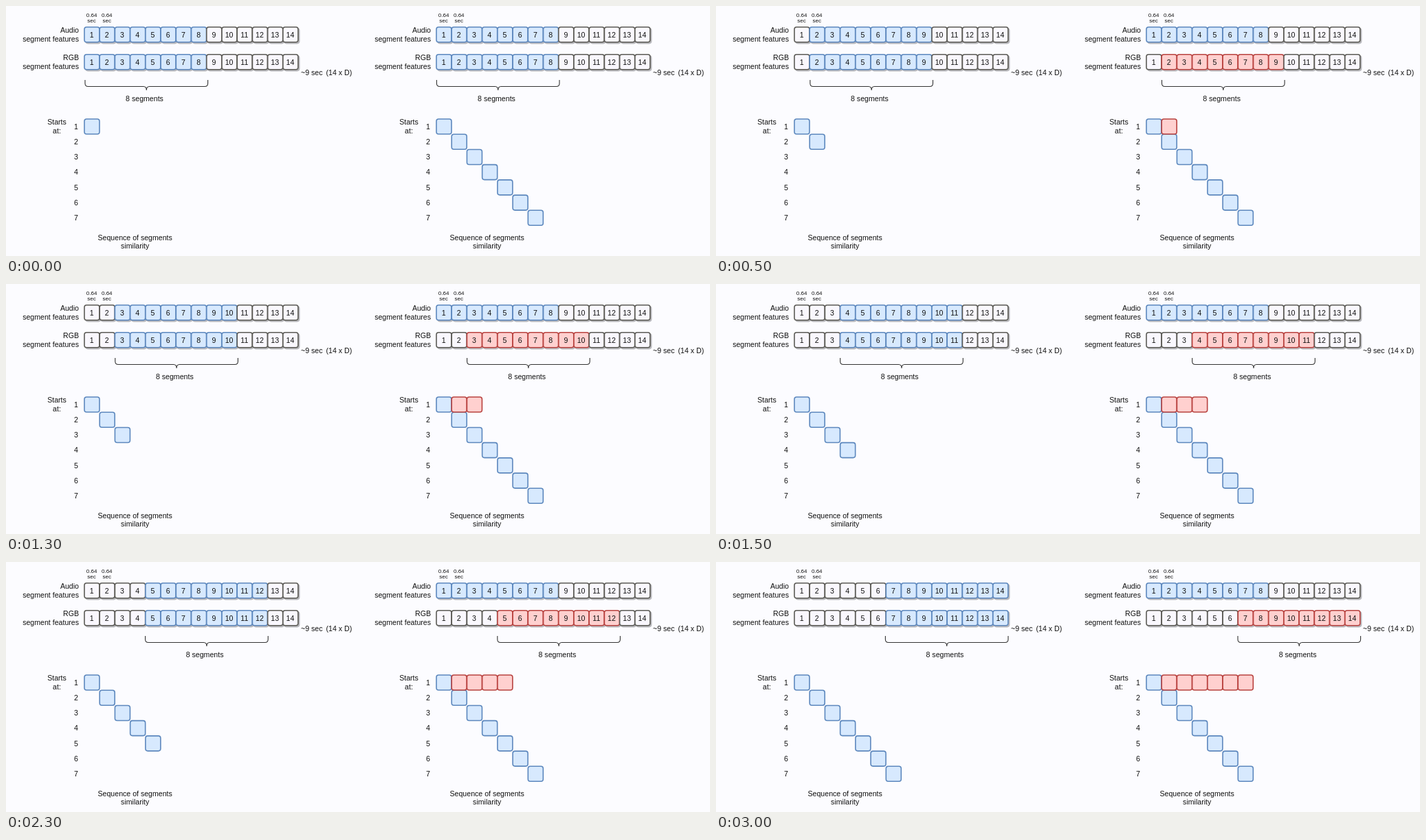
An HTML page that plays this animation: 1024 px wide and 365 px high, repeating every 3500 ms.

```html
<!DOCTYPE html>
<html lang="en">
<head>
<meta charset="utf-8">
<title>Segment similarity</title>
<style>
  html, body { margin: 0; width: 100%; height: 100%; overflow: hidden; background: #fcfcff; }
  svg { display: block; width: 100%; height: 100%; }
  text { font: 10.6px "Liberation Sans", Arial, sans-serif; fill: #111; text-anchor: middle; }
  .end { text-anchor: end; }
  .start { text-anchor: start; }
  .small { font-size: 8px; }
  rect { stroke-width: 1.6; }
  .plain { fill: #f9f7fd; stroke: #5b5a55; }
  .blue { fill: #d7e9fe; stroke: #5c87bd; }
  .red { fill: #ffd0cf; stroke: #b8423f; }
  .shadow { fill: #b9b9bd; stroke: #b9b9bd; }
  .brace { fill: none; stroke: #333; stroke-width: 1.1; }
</style>
</head>
<body>
<svg id="stage" viewBox="0 0 1024 365"></svg>
<script>
const STEPS = 7, STEP_MS = 500, SEGMENTS = 14, SPAN = 8;
const PITCH = 22.22, SIZE = 22, LEFT = 114;
const stage = document.getElementById('stage');

function add(parent, tag, attrs, content = '') {
  const node = document.createElementNS('http://www.w3.org/2000/svg', tag);
  for (const key in attrs) node.setAttribute(key, attrs[key]);
  node.textContent = content;
  parent.append(node);
  return node;
}

const label = (parent, x, y, content, cls = '') =>
  add(parent, 'text', { x, y, class: cls }, content);

const cell = (parent, col, y, cls, shift = 0) =>
  add(parent, 'rect', {
    x: LEFT + col * PITCH + shift, y: y + shift,
    width: SIZE, height: SIZE, rx: 3.3, class: cls
  });

function featureRow(panel, y, name) {
  label(panel, 106, y + 8.4, name, 'end');
  label(panel, 106, y + 21, 'segment features', 'end');
  for (let i = 0; i < SEGMENTS; i++) cell(panel, i, y, 'shadow', 1.8);
  return Array.from({ length: SEGMENTS }, (_, i) => {
    const box = cell(panel, i, y, 'plain');
    label(panel, 124.6 + i * PITCH, y + 14.7, i + 1);
    return box;
  });
}

function makePanel(dx, braceX) {
  const panel = add(stage, 'g', { transform: `translate(${dx} 0)` });
  for (const x of [124.6, 146.8]) {
    label(panel, x, 15.6, '0.64', 'small');
    label(panel, x, 24.3, 'sec', 'small');
  }
  const audio = featureRow(panel, 30.8, 'Audio');
  const rgb = featureRow(panel, 70.8, 'RGB');
  label(panel, 429, 100.8, '~9 sec', 'start');
  label(panel, 503.2, 100.8, '(14 x D)', 'end');

  const marker = add(panel, 'g', {});
  add(marker, 'path', {
    class: 'brace',
    d: `M${braceX} 108 v5 q0 4.5 4.5 4.5 h80.5 q4.3 0 4.3 5.5 ` +
       'q0 -5.5 4.3 -5.5 h80.5 q4.5 0 4.5 -4.5 v-5'
  });
  label(marker, 201.5, 139.4, '8 segments');

  label(panel, 74, 173.2, 'Starts');
  label(panel, 74, 185.6, 'at:');
  const diagonal = [];
  for (let i = 0; i < STEPS; i++) {
    label(panel, 102, 179.8 + i * PITCH, i + 1);
    diagonal.push(cell(panel, i, 165 + i * PITCH, 'blue'));
  }
  label(panel, 187.7, 342, 'Sequence of segments');
  label(panel, 187.7, 354.4, 'similarity');
  return { panel, audio, rgb, marker, diagonal };
}

const left = makePanel(0, 115);
const right = makePanel(512, 114.4);
const matches = Array.from({ length: STEPS - 1 }, (_, i) => cell(right.panel, i + 1, 165, 'red'));

function paint(row, first, cls) {
  row.forEach((box, i) =>
    box.setAttribute('class', i >= first && i < first + SPAN ? cls : 'plain'));
}

function showUpTo(boxes, count) {
  boxes.forEach((box, i) => box.setAttribute('visibility', i < count ? 'visible' : 'hidden'));
}

function render(time) {
  const step = Math.floor(time / STEP_MS) % STEPS;
  paint(left.audio, step, 'blue');
  paint(left.rgb, step, 'blue');
  paint(right.audio, 0, 'blue');
  paint(right.rgb, step, step ? 'red' : 'blue');
  left.marker.setAttribute('transform', `translate(${step * 21.9} 0)`);
  right.marker.setAttribute('transform', `translate(${step * 22.1} 0)`);
  showUpTo(left.diagonal, step + 1);
  showUpTo(matches, step);
}

const begin = performance.now();
function tick() {
  render(performance.now() - begin);
  requestAnimationFrame(tick);
}
tick();
</script>
</body>
</html>
```
